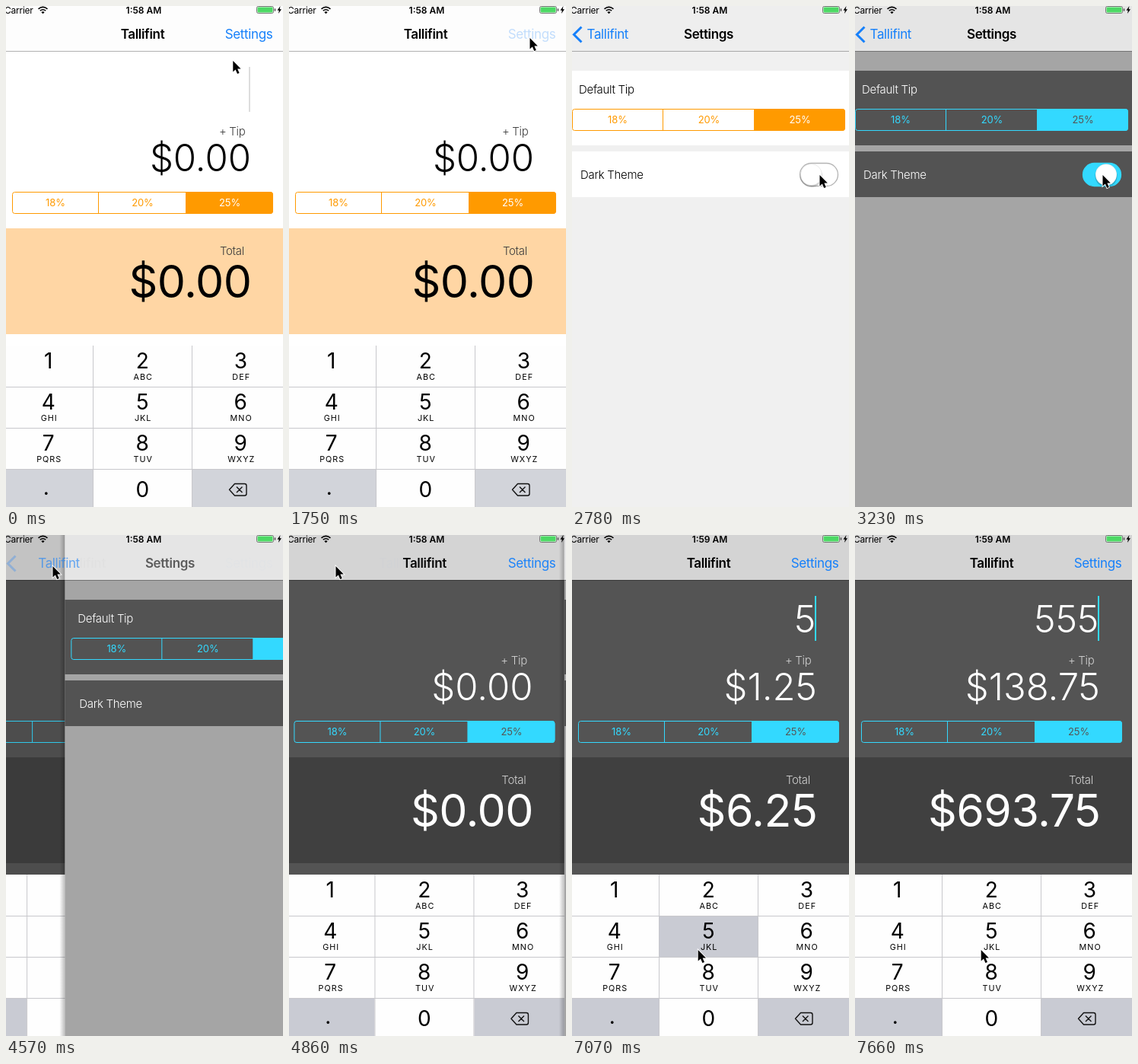
Recreate the animation shown at these times as an HTML page. Size 364 by 658 pixels, loop 8000 ms.

```html
<!DOCTYPE html>
<html lang="en">
<head>
<meta charset="utf-8">
<title>Tip calculator</title>
<style>
html, body { margin: 0; height: 100%; overflow: hidden; background: #fff; }
svg { display: block; width: 100vw; height: 100vh; font-family: Inter, Roboto, sans-serif; }
</style>
</head>
<body>
<svg id="stage" viewBox="0 0 364 658"></svg>
<script>
const LOOP = 8000, TICK = 147.3;   // the screen is sampled once per tick
const APP = 'Tallifint', BLUE = '#1680fa';
const LEFT = -8, WIDTH = 375;      // the phone is slightly wider than the stage
const LIGHT = { tint: '#ff9a00', onTint: '#fff', bg: '#fff', panel: '#ffd6a4', text: '#000', label: '#3c3c3c',
  caret: '#aaa', nav: '#fdfdfd', keys: '#d2d4da', list: '#f0f0f0', row: '#fff', listNav: '#eeeeee' };
const DARK = { tint: '#33d9ff', onTint: '#555', bg: '#545454', panel: '#404040', text: '#fff', label: '#d0d0d0',
  caret: '#33d9ff', nav: '#d4d4d4', keys: '#c9cbd3', list: '#a5a5a5', row: '#535353', listNav: '#e5e5e5' };
const POINTER = [[3, 298.3, 72], [8, 316.5, 42], [15, 316.5, 42], [19, 325.5, 222], [24, 325.5, 222], [28, 61.5, 41],
  [33, 61.5, 41], [37, 277.5, 86], [41, 277.5, 86], [46, 165.7, 545]];
const KEYS = ['', 'ABC', 'DEF', 'GHI', 'JKL', 'MNO', 'PQRS', 'TUV', 'WXYZ'];
const COLUMNS = [55.5, 179, 308];

const rect = (x, y, w, h, fill, more = '') =>
  `<rect x="${x}" y="${y}" width="${w}" height="${h}" fill="${fill}" ${more}/>`;
const path = (d, stroke, width = 1, more = 'fill="none"') =>
  `<path d="${d}" stroke="${stroke}" stroke-width="${width}" ${more}/>`;
const text = (s, x, y, size, fill, { anchor = 'start', weight = 400, gap = -0.02 * size, alpha = 1 } = {}) =>
  `<text x="${x}" y="${y}" font-size="${size}" fill="${fill}" text-anchor="${anchor}" font-weight="${weight}" ` +
  `letter-spacing="${gap}" opacity="${alpha}">${s}</text>`;
const centered = (s, x, y, size, fill, more) => text(s, x, y, size, fill, { anchor: 'middle', ...more });
const rightward = (s, x, y, size, fill, more) => text(s, x, y, size, fill, { anchor: 'end', weight: 300, ...more });
const shift = (x, content) => `<g transform="translate(${x})">${content}</g>`;
const navBar = fill => rect(LEFT, 0, WIDTH, 59, fill) + rect(LEFT, 59, WIDTH, 1, '#000', 'opacity=".3"');

// Critically damped spring, already under way on its first tick.
function spring(ticks) {
  if (ticks < 0) return 0;
  const u = 0.9 + 2.68 * ticks;
  return 1 - (1 + u) * Math.exp(-u);
}

function pointerAt(n) {
  const i = POINTER.findIndex(p => p[0] > n);
  if (i === 0) return POINTER[0].slice(1);
  if (i < 0) return POINTER.at(-1).slice(1);
  const [t0, x0, y0] = POINTER[i - 1], [t1, x1, y1] = POINTER[i];
  const u = (n - t0) / (t1 - t0), e = u * u * (3 - 2 * u);
  return [x0 + (x1 - x0) * e, y0 + (y1 - y0) * e];
}

function caretAlpha(n) {
  if (n >= 12 && n < 34) return 0;
  return n >= 46 ? 1 : [0.4, 0, 0, 0, 1, 1, 1][n % 7];
}

function segments(x, y, dividers, end, centers, c) {
  const [a, b] = dividers;
  return path(`M${b} ${y}H${end - 3}q3 0 3 3v22q0 3 -3 3H${b}z`, c.tint, 1, `fill="${c.tint}"`) +
    rect(x, y, end - x, 28, 'none', `rx="3" stroke="${c.tint}"`) +
    path(`M${a} ${y}v28`, c.tint) +
    ['18%', '20%', '25%'].map((s, i) =>
      centered(s, centers[i], y + 18.7, 13, i < 2 ? c.tint : c.onTint, { gap: -0.1 })).join('');
}

function keypad(n, c) {
  let out = rect(LEFT, 446, WIDTH, 212, '#fefefe') +
    rect(LEFT, 608, 122, 50, c.keys) + rect(245, 608, 123, 50, c.keys);
  if (n === 48 || n === 49) out += rect(115, 501, 129, 53, c.keys);
  out += path('M-8 500.5H367M-8 554.5H367M-8 608.5H367M114.5 446V658M244.5 446V658', '#c8c8cc');
  KEYS.forEach((letters, i) => {
    const x = COLUMNS[i % 3], y = 476 + 54 * Math.floor(i / 3);
    out += centered(i + 1, x, y, 28, '#000') +
      centered(letters, x + 1.2, y + 15, 10.8, '#000', { gap: 1 });
  });
  return out + centered('0', 179, 645, 28, '#000') + centered('.', 52.5, 642, 28, '#000') +
    path('M300.500 627.500H313.500q2.500 0 2.500 2.500V640.500q0 2.500 -2.500 2.500H300.500L293.500 635.300z' +
      'M303 631.500l7.500 7.500m0 -7.500l-7.500 7.500', '#111', 1.4, 'fill="none" stroke-linejoin="round"');
}

function home(n, c, dim) {
  const bill = n < 48 ? '' : n < 50 ? '5' : n < 52 ? '55' : '555';
  const tip = bill * 0.25, total = bill * 1.25;
  return rect(LEFT, 0, WIDTH, 658, c.bg) + navBar(c.nav) +
    rightward(bill, 320.5, 127.5, 49, c.text, { gap: 0 }) +
    rect(319, 80, 2, 59, c.caret, `opacity="${caretAlpha(n)}"`) +
    rightward('+ Tip', 314.5, 170, 15, c.label) +
    rightward('$' + tip.toFixed(2), 322, 217, 49, c.text, { gap: 0 }) +
    segments(8.5, 244.5, [121.5, 236.5], 350.5, [65, 179.5, 294], c) +
    rect(LEFT, 292, WIDTH, 139, c.panel) +
    rightward('Total', 313, 327, 15, c.label) +
    rightward('$' + total.toFixed(2), 322.5, 383, 59, c.text, { weight: 400, gap: -0.5 }) +
    rect(LEFT, 0, WIDTH, 658, '#000', `opacity="${dim}"`) +
    keypad(n, c);
}

function toggle(n, c) {
  const on = n >= 22, knob = n < 22 ? 314.5 : n === 22 ? 330 : 334.5;
  return rect(299.5, 206.5, 50, 30, on ? c.tint : '#fff', `rx="15" stroke="${on ? c.tint : '#b4b4b4'}" stroke-width="1.3"`) +
    `<circle cx="${knob}" cy="223.500" r="14.500" fill="#000" opacity=".18"/>` +
    `<circle cx="${knob}" cy="221.500" r="14" fill="#fff" stroke="#000" stroke-opacity=".08"/>`;
}

function settings(n, c) {
  return rect(LEFT - 7, 0, 7, 658, 'url(#edge)') +
    rect(LEFT, 0, WIDTH, 658, c.list) + navBar(c.listNav) +
    rect(LEFT, 85, WIDTH, 98, c.row) + rect(LEFT, 191, WIDTH, 60, c.row) +
    text('Default Tip', 9, 114.5, 15, c.text, { weight: 300 }) +
    segments(0.5, 135.5, [119.5, 239.5], 358.5, [60, 180, 299.5], c) +
    text('Dark Theme', 11, 226.5, 15, c.text, { weight: 300 }) +
    toggle(n, c);
}

// open: 0 on the calculator, 1 on the settings page
function navItems(n, open) {
  const away = 1 - open, showHome = away ** 3;
  const backPressed = n >= 29 && n < 40;
  const pressed = n >= 12 && n < 20 ? 0.25 : 1;
  return centered(APP, 179.5 - 100 * open, 43, 17, '#000', { weight: 600, alpha: showHome }) +
    rightward('Settings', 350.5, 43, 17, BLUE, { weight: 400, alpha: showHome * pressed }) +
    path('M12.500 27.500L2.500 37.500L12.500 47.500', BLUE, 3, `fill="none" opacity="${open ** 2 * (backPressed ? 0.5 : 1)}"`) +
    text(APP, 19.5 + 100 * away, 43, 17, BLUE, { alpha: open * (backPressed ? 0.8 : 1) }) +
    centered('Settings', 179.5 + 158 * away, 43, 17, '#000', { weight: 600, alpha: open ** 2 });
}

function statusBar(n) {
  return text('Carrier', -2, 10, 12, '#000') +
    path('M42.500 3.800Q48.500 -1 54.500 3.800M44.800 6.200Q48.500 3.300 52.200 6.200', '#000', 1.6) +
    '<path d="M46.300 8Q48.500 6.300 50.700 8L48.500 10.300z"/>' +
    centered(n < 34 ? '1:58 AM' : '1:59 AM', 181, 10, 12, '#000', { weight: 600, gap: 0 }) +
    rect(329.5, 0.5, 22, 9, '#fff', 'rx="2" stroke="#555" stroke-width=".8"') +
    rect(330.5, 1.5, 20, 7, '#4cd964', 'rx="1"') + rect(352.7, 3.3, 1.6, 3.6, '#555', 'rx=".8"') +
    '<path d="M360.500 0L356.500 5.800H358.800L358 10L362 4.300H359.600z"/>';
}

function pointer(n) {
  const [x, y] = pointerAt(n);
  return `<path transform="translate(${x} ${y})" d="M0 0V14.500L3.300 11.400L5.700 17L8.300 15.900L5.900 10.500H10.300z" ` +
    'stroke="#fff" stroke-width="1.8" paint-order="stroke"/>';
}

function scene(n) {
  const theme = n < 22 ? LIGHT : DARK;
  const raw = spring(n - 14) - spring(n - 31);
  const open = raw < 0.003 ? 0 : raw > 0.997 ? 1 : raw;
  return '<defs><linearGradient id="edge"><stop stop-opacity="0"/><stop offset="1" stop-opacity=".25"/></linearGradient></defs>' +
    shift(-0.3 * WIDTH * open, home(n, theme, 0.1 * open)) +
    shift(WIDTH * (1 - open), open ? settings(n, theme) : '') +
    navItems(n, open) + statusBar(n) + pointer(n);
}

const stage = document.getElementById('stage');
let shown = -1;
function frame() {
  const n = Math.floor((performance.now() % LOOP + 25) / TICK);
  if (n !== shown) stage.innerHTML = scene(shown = n);
  requestAnimationFrame(frame);
}
frame();
</script>
</body>
</html>
```
